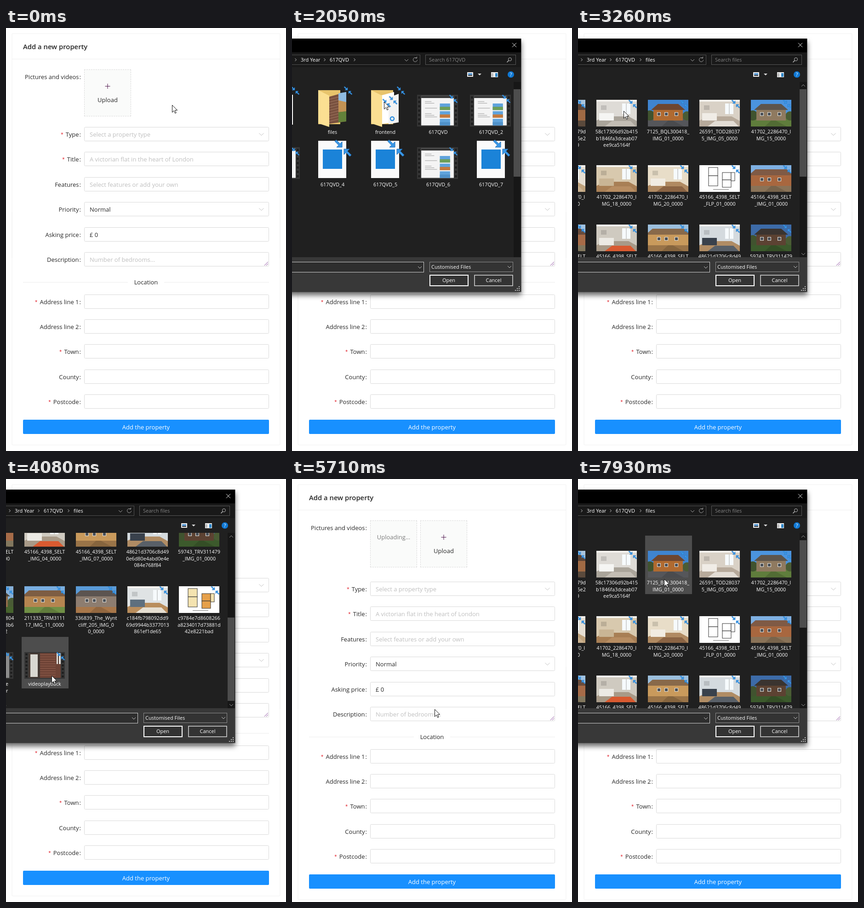
Write an HTML page that moves like this. It is 609 px wide and 919 px high and loops after 8000 ms.

```html
<!DOCTYPE html>
<html lang="en">
<head>
<meta charset="utf-8">
<title>Add a new property</title>
<style>
html, body { margin: 0; width: 100%; height: 100%; overflow: hidden; background: #fff; }
svg { display: block; }
text { font: 13px "Open Sans", "Noto Sans", sans-serif; fill: #262626; white-space: pre; }
.title { font-size: 14.8px; font-weight: 600; }
.hint { fill: #bfbfbf; }
.button { fill: #fff; }
.req { fill: #e0202a; font-family: "Liberation Mono", monospace; }
.dialog text { font-size: 11px; fill: #fff; }
.dialog .name { font-size: 10.8px; }
.dialog .search { fill: #858585; }
.mid { text-anchor: middle; }
.end { text-anchor: end; }
.line { fill: none; stroke-width: 1; }
.anim { animation: 8s step-end infinite; }
.shadow { filter: drop-shadow(0 7px 6px #0009); }
</style>
</head>
<body>
<svg id="stage" width="609" height="919" viewBox="0 0 609 919"></svg>
<script>
const rect = (x, y, w, h, fill, more = '') =>
  `<rect x="${x}" y="${y}" width="${w}" height="${h}" fill="${fill}" ${more}/>`;
const box = (x, y, w, h, stroke, more = '') =>
  rect(x + .5, y + .5, w - 1, h - 1, 'none', `stroke="${stroke}" ${more}`);
const line = (d, stroke, more = '') => `<path class="line" d="${d}" stroke="${stroke}" ${more}/>`;
const poly = (points, fill) => `<polygon points="${points}" fill="${fill}"/>`;
const text = (x, y, s, cls = '') => `<text x="${x}" y="${y}" class="${cls}">${s}</text>`;
const anim = (name, body) => `<g class="anim" style="animation-name:${name}">${body}</g>`;
const at = (x, y, body, scale = 1) => `<g transform="translate(${x} ${y}) scale(${scale})">${body}</g>`;
const chevron = (x, y, size, stroke) => line(`M${x - size} ${y - size / 2}l${size} ${size}l${size} ${-size}`, stroke);

// Timeline: times in ms of the 8 s loop
const steps = (name, frames) =>
  `@keyframes ${name}{${frames.map(([ms, css]) => `${ms / 80}%{${css}}`).join('')}}`;
const toggle = (name, ...times) =>
  steps(name, [[0, 'opacity:0'], ...times.map((ms, i) => [ms, `opacity:${i % 2 ? 0 : 1}`])]);
const move = (name, frames) =>
  steps(name, frames.map(([ms, x, y]) => [ms, `transform:translate(${x}px,${y}px)`]));
const pose = (alpha, s = 1, x = 0, y = 0) => `opacity:${alpha};transform:matrix(${s},0,0,${s},${x},${y})`;

const css = [
  steps('window', [
    [0, pose(0)], [1650, pose(.78, .989, 1.5, 3.25)], [1850, pose(1)],
    [5100, pose(.2, .96, 3.9, 10.9)], [5310, pose(0)],
    [6730, pose(.43, .973, 2.5, 7.6)], [6930, pose(1)]]),
  toggle('shell', 1650, 1850, 6730, 6930),
  toggle('shellBar', 6730, 6930),
  toggle('close', 1650, 5100, 6730),
  toggle('course', 1850, 3260),
  toggle('files', 3260, 5310, 6930),
  toggle('folderHover', 2450, 3260),
  toggle('folderPick', 2860, 3260),
  toggle('videoHover', 4080, 4480),
  toggle('videoPick', 4280, 4890),
  toggle('typed', 4280, 5310),
  toggle('openHover', 4890, 5310),
  toggle('houseHover', 7730),
  toggle('focus', 1040, 5310, 6120),
  toggle('uploading', 5520),
  move('push', [[0, 0, 0], [5520, 109, 0]]),
  move('drop', [[0, 0, 0], [5520, 0, 8]]),
  move('scroll', [[0, 0, 0], [3460, 0, -113], [3660, 0, -225], [3880, 0, -338], [5310, 0, 0]]),
  move('thumb', [[0, 0, 0], [3460, 0, 56], [3660, 0, 112], [3880, 0, 168], [5310, 0, 0]]),
  move('pointer', [
    [0, 361, 167], [440, 352, 166], [640, 325, 160], [840, 290, 157], [1040, 262, 155],
    [1240, 236, 154], [1430, 227, 153], [2050, 200, 160], [2250, 160, 170], [2450, 120, 178],
    [2640, 102, 180], [2860, 99, 180], [3460, 99, 240], [3660, 99, 310], [3880, 99, 390],
    [4080, 99, 427], [4480, 130, 450], [4690, 240, 520], [4890, 307, 541], [5520, 310, 500],
    [5720, 318, 380], [5920, 325, 240], [6120, 328, 165], [6330, 327, 151], [7130, 322, 175],
    [7330, 300, 230], [7530, 286, 263], [7730, 215, 232], [7930, 187, 217]]),
].join('');

// Form
const label = (y, name, required) => {
  const star = required ? '<tspan class="req">*</tspan><tspan dx="4">' : '<tspan>';
  return text(158.5, y, `${star}${name}</tspan>`, 'end') + text(163, y, ':', 'end');
};
const field = (y, name, { value = '', hint = '', required, select } = {}) =>
  label(y + 5, name, required) +
  box(170, y - 16, 402, 31, '#d9d9d9', 'rx="2"') +
  text(182, y + 5, value || hint, value ? '' : 'hint') +
  (select ? chevron(555.5, y, 5, '#bfbfbf') : '');
const rows = (top, list) => list.map(([name, opts], i) => field(Math.round(top + 54.4 * i), name, opts)).join('');
const dashes = stroke =>
  line('M170 90.5h102M170 191.5h102M170.5 90v102M271.5 90v102', stroke, 'stroke-dasharray="3 1.95"');
const tile = rect(170, 90, 102, 102, '#fafbfa') + dashes('#d9d9d9');
const required = true, select = true;

const form =
  line('M13 500V14q0-2 2-2H594q2 0 2 2V500M13 67.5H596', '#f0f0f0') +
  text(37, 46, 'Add a new property', 'title') +
  label(111, 'Pictures and videos') +
  anim('uploading', tile + `<g opacity=".6">${text(221, 130.5, 'Uploading...', 'mid')}</g>`) +
  anim('push', tile + anim('focus', dashes('#40a9ff')) +
    line('M215.5 126.5h11m-5.5-5.5v11', '#4a1048', 'stroke-width="1.4"') + text(221, 161, 'Upload', 'mid')) +
  anim('drop',
    line('M13 400V904q0 2 2 2H594q2 0 2-2V400', '#f0f0f0') +
    rows(231, [
      ['Type', { hint: 'Select a property type', required, select }],
      ['Title', { hint: 'A victorian flat in the heart of London', required }],
      ['Features', { hint: 'Select features or add your own' }],
      ['Priority', { value: 'Normal', select }],
      ['Asking price', { value: '£ 0' }],
      ['Description', { hint: 'Number of bedrooms...' }]]) +
    line('M562 516l8-8m-4 8l4-4', '#8a4a9c') +
    line('M37 552.5H265M344 552.5H572', '#ececec') + text(304.5, 557, 'Location', 'mid') +
    rows(594.6, [
      ['Address line 1', { required }], ['Address line 2'], ['Town', { required }],
      ['County'], ['Postcode', { required }]]) +
    rect(37, 851, 535, 31, '#1890ff', 'rx="2"') + text(304.5, 872, 'Add the property', 'mid button'));

// Thumbnails, drawn in an 88 x 58 frame
const house = (sky, wall, roof, ground, inset = 12) =>
  rect(0, 0, 88, 58, sky) + rect(0, 40, 88, 18, ground) +
  (inset ? `<circle cx="4" cy="34" r="11" fill="#40532f"/><circle cx="85" cy="35" r="10" fill="#4a5c35"/>` : '') +
  rect(inset, 20, 88 - 2 * inset, 25, wall) +
  poly(`${inset - 5},22 ${inset + 10},9 ${78 - inset},9 ${93 - inset},22`, roof) +
  [20, 36, 58].map(x => rect(x, 27, 8, 8, '#e9e6df') + rect(x + 1, 28, 6, 6, '#4a5058')).join('') +
  poly('30,58 44,45 54,45 78,58', '#0002');
const room = (wall, floor, piece, accent) =>
  rect(0, 0, 88, 58, wall) + poly('0,58 0,45 20,36 70,36 88,46 88,58', floor) +
  rect(56, 8, 18, 23, '#f6fafc') + rect(64.5, 8, 1, 23, '#aaa') + rect(0, 0, 88, 4, '#f4f2ee') +
  rect(6, 29, 32, 16, piece) + rect(10, 12, 12, 10, '#0002') + poly('18,58 34,46 74,46 86,58', accent);
const plan = (left, right) =>
  rect(0, 0, 88, 58, '#fff') +
  [[20, 5, 20, 18, left], [20, 23, 20, 22, left], [50, 16, 19, 16, right], [50, 32, 19, 16, right], [69, 16, 8, 18, left]]
    .map(([x, y, w, h, fill]) => rect(x, y, w, h, fill, 'stroke="#333"')).join('') + rect(30, 52, 34, 1.5, '#999');
const film = inner =>
  rect(0, 0, 88, 58, '#353535') +
  [...Array(7)].map((_, i) => rect(2.5, 3 + i * 8, 4, 4, '#1c1c1c') + rect(81.5, 3 + i * 8, 4, 4, '#1c1c1c')).join('') + inner;
const page = film(rect(9, 2, 70, 54, '#f4f4f4') + rect(9, 2, 70, 4, '#333') +
  [12, 15, 24, 34, 37, 40].map((y, i) => rect(17, y, 14 + i % 3 * 6, 1, '#aaa')).join('') +
  [[18, '#6d9f58'], [32, '#c47a3e'], [46, '#4f91c9']].map(([y, c]) => rect(49, y - 2, 22, 12, '#5fa3dc') + rect(49, y + 4, 22, 6, c)).join(''));
const brickVideo = film(rect(9, 2, 70, 54, '#6e4336') +
  [...Array(10)].map((_, i) => rect(33, 5 + i * 5, 35, 1, '#94604f')).join('') +
  rect(9, 2, 25, 54, '#453a34') + rect(13, 5, 16, 49, '#d8d8d2') + rect(70, 2, 9, 24, '#e3e0da') + rect(73, 2, 2, 24, '#4a3028'));
const arrow = 'M-1-1H-7L-4.8-3.2L-9-7.4L-7.4-9L-3.2-4.8L-1-7Z';
const arrows = ['', 'rotate(180)'].map(turn =>
  `<path d="${arrow}" transform="${turn}" fill="#3a97e6" stroke="#1f6fb8" stroke-width=".5"/>`).join('');
const frame = (x, y, body, w = 88, h = 58) =>
  `<svg x="${x}" y="${y}" width="${w}" height="${h}" viewBox="0 0 88 58" preserveAspectRatio="none">${body}</svg>`;
const caption = (x, y, lines) => lines.split('|').map((s, i) => text(x, y + i * 14.5, s, 'name mid')).join('');

const fileRow = (top, items) => items.map(([art, name], i) => {
  const x = -28 + 112 * i;
  return frame(x - 44, top, art) + at(x + 35, top + 9, arrows) + caption(x, top + 73, name);
}).join('');

const fileList =
  anim('houseHover', rect(146, 123, 102, 127, '#4d4d4d')) +
  anim('videoHover', rect(34, 681, 102, 112, '#4d4d4d')) +
  anim('videoPick', rect(34, 681, 102, 112, '#777')) +
  fileRow(156, [
    [house('#a9c4dc', '#a06a44', '#5c4436', '#5b4a3c', 0), '52b83c17f06e79d|a8310d94cb7f5e2|7ea91c4d50'],
    [room('#dedbd6', '#aaa49a', '#f5f5f3', '#c3bdb4'), '58c17306d92b415|b1846fa3dceab07|ee9ca5164f'],
    [house('#3f84d0', '#b06a30', '#6e4630', '#55565a'), '7125_BQL300418_|IMG_01_0000'],
    [room('#d9d1c6', '#b7aa9b', '#f0ece6', '#e2dcd4'), '26591_TOD28037|5_IMG_05_0000'],
    [house('#4b94de', '#8f7a60', '#5d554c', '#5f7d3c'), '41702_2286470_I|MG_15_0000']]) +
  fileRow(298, [
    [room('#e6dfd3', '#bfa27c', '#efe9df', '#cbb290'), '41702_2286470_I|MG_16_0000'],
    [room('#d8c9ae', '#a87f55', '#c9b595', '#b78d62'), '41702_2286470_I|MG_18_0000'],
    [room('#e8ddc8', '#b08a62', '#f1ece2', '#8b6444'), '41702_2286470_I|MG_20_0000'],
    [plan('#fff', '#fff'), '45166_4398_SELT|_FLP_01_0000'],
    [house('#7fb0e2', '#a8673f', '#7f5a45', '#8a7358', 0), '45166_4398_SELT|_IMG_01_0000']]) +
  fileRow(427, [
    [house('#9fc3e4', '#a66b48', '#694c3c', '#82775e', 0), '45166_4398_SELT|_IMG_02_0000'],
    [room('#cfcac0', '#a89a88', '#eceae4', '#d95a30'), '45166_4398_SELT|_IMG_04_0000'],
    [house('#9cbfdd', '#c99a5c', '#88694a', '#9a7448', 0), '45166_4398_SELT|_IMG_07_0000'],
    [room('#d4dade', '#b08c64', '#39414c', '#596068'), '48621d3706c8d49|0e6d80e4abd0e4e|084e768f84'],
    [house('#3d6ba8', '#5c4232', '#3a3430', '#3c5a2c'), '59743_TRV311479|_IMG_01_0000']]) +
  fileRow(571, [
    [house('#86b0d8', '#8c6a48', '#4d4438', '#47632e'), '18d06fb25ae7804|c52d8e91f3a08b6|94b0e7d312'],
    [house('#79aee0', '#b58550', '#7d5d43', '#6f8f45', 0), '211333_TRM3111|17_IMG_11_0000'],
    [house('#5a9bd8', '#8d7d70', '#5c5450', '#a8774a', 0), '336839_The_Wynt|cliff_205_IMG_0|0_0000'],
    [room('#dfe3e4', '#b98d5c', '#5e6f7e', '#e6dfd2'), 'c184fb798092dd9|69d9944b3377013|861ef1de65'],
    [plan('#f4e3b0', '#e6a04a'), 'c9784e7d8608266|a8234017d73881d|42e8221bad']]) +
  fileRow(714, [
    [film(rect(9, 2, 70, 54, '#8c8c8c')), 'Home_estate|Tour_interior|v2|final_walk...'],
    [brickVideo, 'videoplayback']]);

const folder = inner => rect(0, 2, 48, 74, '#e8c46c') + inner + poly('0,2 24,14 24,82 0,74', '#fbdf92');
const brickPage = poly('18,18 61,6 61,70 18,76', '#79513f') +
  [...Array(9)].map((_, i) => line(`M24 ${22 + i * 6}L44 ${17 + i * 6}`, '#a47a64')).join('') +
  poly('44,9 61,6 61,30 44,26', '#8fbbe0') + poly('44,24 61,28 61,48 44,50', '#c39354') + poly('44,50 61,48 61,70 44,72', '#63813a');
const codePage = poly('20,14 50,6 50,72 20,76', '#fff') + poly('38,18 60,10 60,72 38,76', '#f2f2f2') +
  at(34, 30, arrows) + at(48, 24, arrows) + `<circle cx="46" cy="64" r="4" fill="none" stroke="#2f8fe0" stroke-width="2.5"/>`;
const moviePage = x => rect(x - 31, 245, 61, 81, '#fafafa') + rect(x - 21, 264, 42, 42, '#1b83d8') + at(x + 23, 261, arrows, 2);
const filmTile = (x, y) => frame(x - 45, y, page, 89, 69) + at(x + 34, y + 9, arrows);

const courseList =
  anim('folderHover', rect(38, 124, 100, 111, '#4d4d4d')) +
  anim('folderPick', rect(38, 124, 100, 111, '#777') + box(38, 124, 100, 111, '#888')) +
  rect(-50, 145, 52, 65, '#f4f4f4') + at(7, 136, arrows) +
  at(57, 133, folder(brickPage)) + at(122, 136, arrows) +
  at(172, 133, folder(codePage)) + at(237, 136, arrows) +
  filmTile(317, 145) + filmTile(432, 145) +
  filmTile(-27, 259) + moviePage(88) + moviePage(203) + filmTile(317, 259) + moviePage(433) +
  ['files', 'frontend', '617QVD', '617QVD_2'].map((s, i) => caption(88 + 115 * i, 229.5, s)).join('') +
  [4, 5, 6, 7].map((n, i) => caption(88 + 115 * i, 343.5, '617QVD_' + n)).join('');

// File dialog
const crumb = x => line(`M${x - 1.5} 66l3 3l-3 3`, '#ccc');
const chrome =
  rect(-300, 23, 798, 550, '#202020') + rect(-300, 23, 798, 30, '#000') + rect(-300, 53, 798, 32, '#191919') +
  box(-300, 58, 579, 22, '#505050') + box(290, 58, 197, 22, '#585858') +
  crumb(8) + text(19, 73, '3rd Year') + crumb(71) + text(82, 73, '617QVD') + crumb(136) +
  chevron(249, 70, 4, '#aaa') + line('M271 65.5a4.5 4.5 0 1 0 1.5 4M268.5 65.5h3v-3', '#aaa') +
  `<circle cx="474" cy="68" r="3.5" class="line" stroke="#bbb"/>` + line('M471.5 70.5l-4 4', '#bbb', 'style="stroke-width:1.6"') +
  rect(381, 96, 13, 10, '#f2f2f2') + rect(383, 98, 9, 4, '#5b9bd5') + rect(383, 102, 9, 2, '#333') +
  poly('404,99 412,99 408,103', '#ddd') +
  rect(433, 96, 15, 11, '#f2f2f2') + rect(434, 98, 4, 8, '#bbb') + rect(442, 98, 5, 8, '#2e86c8') +
  `<circle cx="476" cy="101" r="7" fill="#0f78d4"/>` + text(476, 105, '?', 'mid');
const footer =
  rect(-300, 498, 798, 75, '#383838') +
  rect(-300, 508, 587, 23, '#2e2e2e') + box(-300, 508, 587, 23, '#d0d0d0') + chevron(278, 520, 4, '#ccc') +
  anim('typed', rect(-61, 511, 76, 17, '#0078d7') + text(14, 523.5, 'videoplayback', 'end')) +
  rect(299, 508, 182, 22, '#333') + box(299, 508, 182, 22, '#909090') +
  text(303, 523, 'Customised Files') + chevron(473, 519, 4, '#ccc') +
  rect(300, 537, 83, 23, '#333', 'stroke="#fff" stroke-width="2"') +
  anim('openHover', rect(301, 538, 81, 21, '#777')) + text(341, 552, 'Open', 'mid') +
  rect(397, 537, 83, 23, '#333', 'stroke="#d0d0d0" stroke-width="1.6"') + text(438.5, 552, 'Cancel', 'mid') +
  [[494, 563], [494, 567], [494, 571], [490, 567], [490, 571], [486, 571]]
    .map(([x, y]) => rect(x - 1, y - 2, 2, 2, '#ccc')).join('');
const shell =
  rect(-300, 23, 798, 550, '#fff') + rect(-300, 23, 798, 30, '#000') + rect(-300, 498, 798, 75, '#383838') +
  anim('shellBar', rect(481, 134, 17, 189, '#4d4d4d') + rect(481, 323, 17, 159, '#171717') + rect(481, 506, 17, 50, '#171717')) +
  rect(-300, 507, 587, 23, '#fff') + rect(299, 507, 182, 23, '#fff') +
  rect(299, 535, 85, 25, '#fff') + rect(396, 535, 85, 25, '#fff') + rect(481, 556, 17, 17, '#fff');

const dialog = `<g class="dialog">` + anim('window',
  rect(-300, 23, 798.5, 550.5, '#202020', 'class="shadow"') + chrome +
  `<g clip-path="url(#list)">` +
  anim('course', courseList) + anim('files', anim('scroll', fileList)) + `</g>` +
  rect(482, 117, 16, 381, '#171717') +
  `<g clip-path="url(#track)">${anim('thumb', rect(482, 133, 15, 190, '#4d4d4d'))}</g>` +
  anim('course', text(298, 73, 'Search 617QVD', 'search')) +
  anim('files', text(147, 73, 'files') + text(298, 73, 'Search files', 'search') +
    line('M486 127l4-4l4 4M486 489l4 4l4-4', '#999')) +
  footer + anim('shell', shell) +
  anim('close', line('M479 32.5l9 9m0-9l-9 9', '#fff'))) + `</g>`;

const pointer = anim('pointer',
  `<path d="M.5.5V16.2L4.2 12.7L6.8 18.3L9.2 17.2L6.7 11.7H11.7Z" fill="#fff" stroke="#111"/>`);

document.getElementById('stage').innerHTML =
  `<style>${css}</style><clipPath id="list"><rect x="-300" y="117" width="782" height="381"/></clipPath>` +
  `<clipPath id="track"><rect x="482" y="133" width="16" height="349"/></clipPath>` +
  form + dialog + pointer;
</script>
</body>
</html>
```
